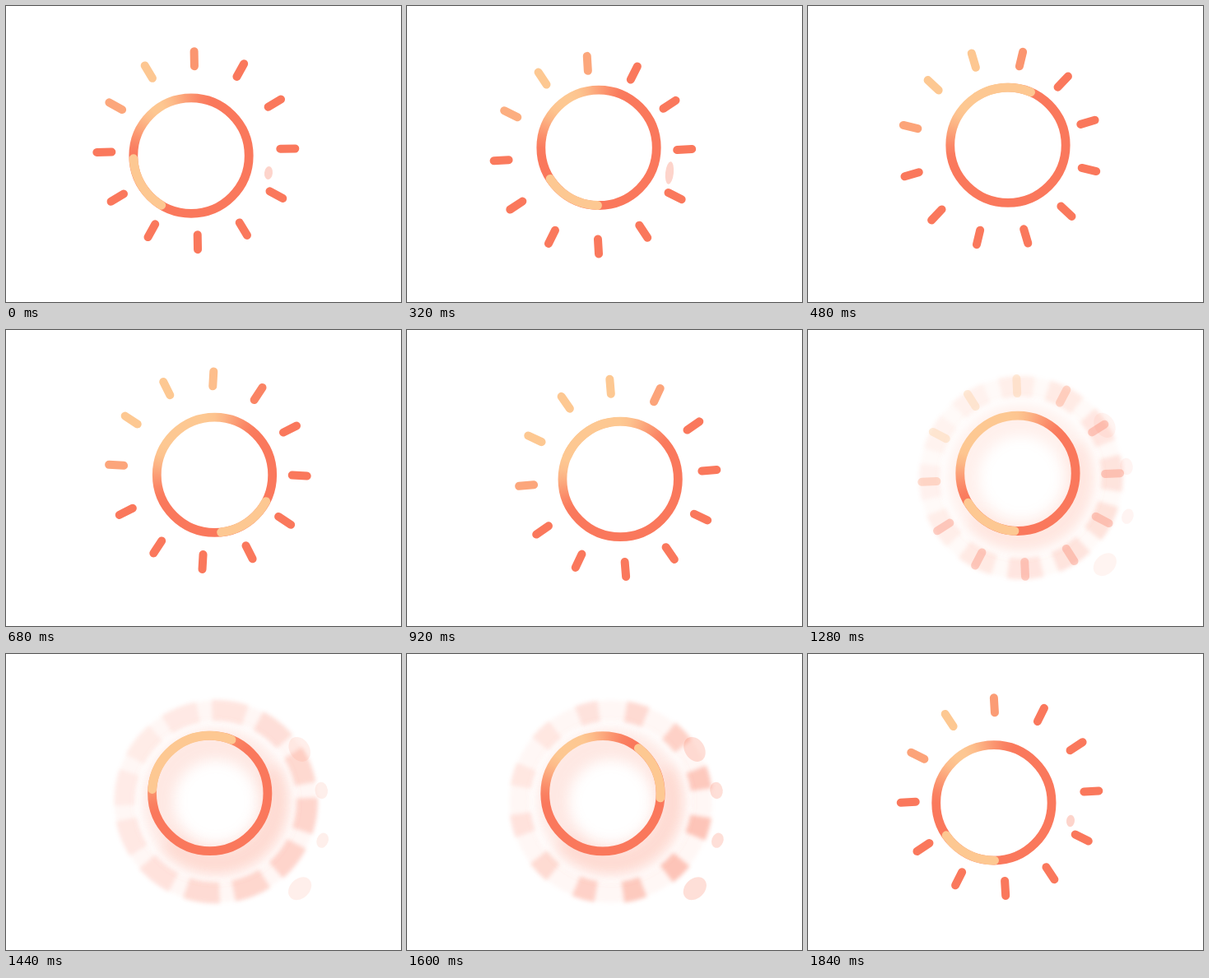
An HTML page with a canvas that plays this animation: 480x360 px, repeating every 1880 ms.

```html
<!DOCTYPE html>
<html lang="en">
<head>
<meta charset="utf-8">
<title>Swaying sun</title>
<style>
  html, body { margin: 0; width: 100%; height: 100%; overflow: hidden; background: #fff; }
  canvas { display: block; }
</style>
</head>
<body>
<canvas id="stage" width="480" height="360"></canvas>
<script>
const ctx = document.getElementById('stage').getContext('2d');
const LOOP = 1880, STEP = 40, LAG = 160;
const CORAL = [250, 120, 92], PEACH = [253, 200, 146];

const rad = deg => deg * Math.PI / 180;
const clock = deg => rad(deg - 90);
const cosDeg = deg => Math.cos(rad(deg));
const ramp = (v, a, b) => Math.min(1, Math.max(0, (v - a) / (b - a)));
const smooth = x => x * x * (3 - 2 * x);
const mix = (a, b, m) => a + (b - a) * m;
const rgba = (c, a = 1) => `rgba(${c.map(Math.round)},${a})`;

// Looping sum of cosines; each [amplitude, lag] pair is the next harmonic.
const wave = (t, ...pairs) => pairs.reduce((sum, [amp, lag], i) =>
  sum + amp * Math.cos((i + 1) * 2 * Math.PI * (t - lag) / LOOP), 0);

const swayX = t => 244 + wave(t, [-17.5, 60], [-2, 60]);
const swayY = t => 175.7 + wave(t, [-1.2, -183], [6.2, 34], [1.8, 71]);

// The rays trail the ring along the same figure of eight.
function pose(t) {
  const blur = ramp(t, 1200, 1320) * (1 - ramp(t, 1640, 1760));
  return {
    blur,
    settle: ramp(t, 1440, 1600),
    ringX: swayX(t),
    ringY: swayY(t),
    raysX: swayX(t - LAG),
    raysY: mix(swayY(t - LAG) + .7, 179.5, blur),
    spin: 150 * t / LOOP + 7.5 + wave(t, [-8, 180], [-2, 30]),
    arc: 1440 * t / LOOP + 307 + wave(t, [-44.7, -139], [-20, 0], [-8, 0]),
    glow: 46 + wave(t, [-17, 60])
  };
}

// Peach at the upper left, coral on the far side
function tint(deg, glow) {
  const off = Math.abs(((deg - 325) % 360 + 540) % 360 - 180);
  const m = 1 - smooth(ramp(off, glow - 28, glow + 28));
  return CORAL.map((c, i) => mix(c, PEACH[i], m));
}

function strokeArc(x, y, r, from, to, width, style, cap = 'butt') {
  ctx.beginPath();
  ctx.arc(x, y, r, clock(from), clock(to));
  ctx.lineWidth = width;
  ctx.strokeStyle = style;
  ctx.lineCap = cap;
  ctx.stroke();
}

function smudge(x, y, rx, ry, tilt, alpha) {
  ctx.beginPath();
  ctx.ellipse(x, y, rx, ry, rad(tilt), 0, 2 * Math.PI);
  ctx.fillStyle = rgba(CORAL, alpha);
  ctx.fill();
}

function drawRays(p) {
  ctx.lineWidth = 10;
  ctx.lineCap = 'round';
  for (let i = 0; i < 12; i++) {
    const deg = p.spin + i * 30, a = clock(deg);
    const c = Math.cos(a), s = Math.sin(a);
    ctx.beginPath();
    ctx.moveTo(p.raysX + 102.5 * c, p.raysY + 102.5 * s);
    ctx.lineTo(p.raysX + 120.5 * c, p.raysY + 120.5 * s);
    ctx.strokeStyle = rgba(tint(deg, p.glow));
    ctx.stroke();
  }
}

function drawHaze({ raysX: x, raysY: y, spin, settle }) {
  ctx.filter = 'blur(8px)';
  strokeArc(x, y, 70, 0, 360, 38, rgba(CORAL, .17));
  strokeArc(x, y, 76, 60, 230, 28, rgba(CORAL, .12));
  ctx.filter = 'blur(2.5px)';
  strokeArc(x, y, 111, 0, 360, 24, rgba(CORAL, .06));
  const half = mix(10.5, 6.5, settle);
  for (let i = 0; i < 12; i++) {
    const deg = spin + i * 30;
    const alpha = mix(.27, .4, settle) * (.65 - .35 * cosDeg(deg - 300));
    strokeArc(x, y, 111, deg - half, deg + half, 26, rgba(CORAL, alpha));
  }
  ctx.filter = 'none';
  // Crumbs thrown off along the right side
  for (let k = 0; k < 4; k++) {
    const deg = 58 + 26 * k, r = 120 + 9 * k, size = 12 + 4 * Math.cos(2 * k);
    smudge(x + r * Math.cos(clock(deg)), y + r * Math.sin(clock(deg)),
      .75 * size, size, deg - 90, mix(.12, .24, settle));
  }
}

function drawRing({ ringX: x, ringY: y, arc, glow }, t) {
  const sweep = ctx.createConicGradient(clock(0), x, y);
  for (let i = 0; i <= 36; i++) sweep.addColorStop(i / 36, rgba(tint(i * 10, glow)));
  strokeArc(x, y, 70.2, 0, 360, 10.8, sweep);
  const half = 28 + 26 * ramp(t, 1320, 1440) * (1 - ramp(t, 1440, 1560));
  strokeArc(x, y, 70.2, arc - half, arc + half, 10.8, rgba(PEACH), 'round');
}

// A faint fleck beside the rays, growing across the loop seam
function drawFleck(t) {
  const age = t > LOOP / 2 ? t - LOOP : t;
  if (age >= -100 && age < 440) smudge(319, 203, 5, 8 + .018 * age, 6, .32);
}

function draw(now) {
  const t = Math.floor(now % LOOP / STEP) * STEP;
  const p = pose(t);
  ctx.globalAlpha = 1;
  ctx.fillStyle = '#fff';
  ctx.fillRect(0, 0, 480, 360);
  drawFleck(t);
  ctx.globalAlpha = p.blur;
  if (p.blur > 0) drawHaze(p);
  ctx.globalAlpha = 1 - p.blur;
  drawRays(p);
  ctx.globalAlpha = 1;
  drawRing(p, t);
}

function tick() {
  draw(performance.now());
  requestAnimationFrame(tick);
}
tick();
</script>
</body>
</html>
```
